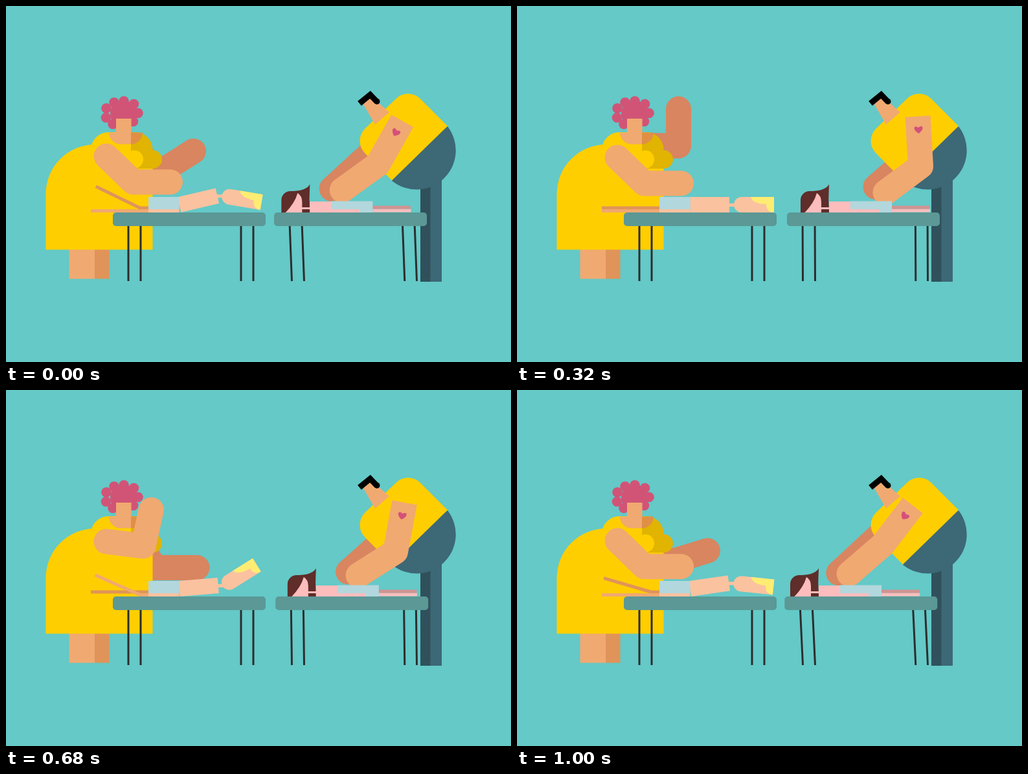
Recreate the animation shown at these times as an HTML page. Size 780x550 px, loop 1.04 s.

```html
<!DOCTYPE html>
<html lang="en">
<head>
<meta charset="utf-8">
<title>Massage</title>
<style>
  html, body { margin: 0; width: 100%; height: 100%; overflow: hidden; background: #64c9c7; }
  svg { display: block; width: 780px; height: 550px; }
  .yellow { fill: #ffce00; }
  .gold { fill: #e0b400; }
  .skin { fill: #f0a971; }
  .tan { fill: #e09459; }
  .curls { fill: #d15477; }
  .pale { fill: #fbc29f; }
  .blond { fill: #ffed73; }
  .rosy { fill: #fdbdbd; }
  .brown { fill: #5f2d2a; }
  .towel { fill: #b2d7dd; }
  .slate { fill: #3d6875; }
  .shade { fill: #30515c; }
  .top { fill: #5b9896; }
  .posts { fill: none; stroke: #2d2d2d; stroke-width: 3; }
  .limb { fill: none; stroke: #f0a971; stroke-width: 39; stroke-linejoin: round; stroke-linecap: round; }
  .far { stroke: #d88560; }
  .shin { stroke-width: 5; stroke-linecap: butt; }
  .shin.far { stroke: #e09459; }
  .cut { stroke-linecap: butt; }
</style>
</head>
<body>
<svg viewBox="0 0 780 550">
  <!-- woman -->
  <path id="farArm" class="limb far"/>
  <path class="skin" d="M97.5 370H137V421.5H97.5z"/>
  <path class="tan" d="M137 370H159.5V421.5H137z"/>
  <path class="yellow" d="M61.5 376.5V290A76 76 0 0 1 137.5 214H200V240H226.5V376.5z"/>
  <path class="yellow" d="M131 222A27 27 0 0 1 158 195H193V260H131z"/>
  <path class="gold" d="M193 195H200A27 27 0 0 1 226.500 222.800A14.200 14.200 0 0 1 227 251.200H193z"/>
  <circle class="yellow" cx="198" cy="237" r="14"/>
  <g id="curls" class="curls"><circle cx="181" cy="166" r="20"/></g>
  <path class="skin" d="M159 195.500H170V174H193.500V213.500H177A18 18 0 0 1 159 195.500z"/>
  <path class="tan" d="M193 195.500H211A18 18 0 0 1 193 213.500z" style="fill:#e08f45"/>

  <!-- left table and client -->
  <path class="posts" d="M189 338V425M208 338V425M363 338V425M382 338V425"/>
  <rect class="top" x="165" y="319" width="236" height="21" rx="5"/>
  <path id="farShin" class="limb shin far"/>
  <path id="nearShin" class="limb shin"/>
  <path class="pale" d="M220 295H267.500V319H220z"/>
  <path id="torso" class="pale" d="M267.500 295H328V319H267.500z"/>
  <path class="towel" d="M220 295H267.500V314H220z"/>
  <g id="neck">
    <path class="pale" d="M326 305H340V310H326z"/>
    <g id="head">
      <path class="pale" d="M347 295H397V319H347A12 12 0 0 1 347 295z"/>
      <path class="blond" d="M361 295Q364 305.500 385 306Q385 319 397 319V295z"/>
    </g>
  </g>
  <path id="nearArm" class="limb"/>

  <!-- man -->
  <path id="farPush" class="limb far"/>
  <path class="shade" d="M640 250H656V426H640z"/>
  <path class="slate" d="M655.500 240H673V426H655.500z"/>
  <path class="slate" d="M682 186A60.500 60.500 0 0 1 596 270L610 240z"/>
  <path class="yellow" d="M596 269.500L554.400 227.600A27 27 0 0 1 554.400 189.400L602 143.400A27 27 0 0 1 640 143.400L682 185.500z"/>
  <path class="skin" d="M552 152L563 139L592 164L570 183z"/>
  <path d="M546 150.500L562.500 137L573 148" fill="none" stroke="#000" stroke-width="9"/>
  <circle cx="573" cy="147.500" r="4.500"/>
  <path id="push" class="limb cut"/>
  <circle id="palm" class="skin" r="19.500"/>
  <path id="heart" fill="#d4517a" d="M0 6C-11 -1 -6 -8.500 0 -3C6 -8.500 11 -1 0 6z"/>

  <!-- right table and client -->
  <path id="posts" class="posts"/>
  <rect id="bench" class="top" x="417" y="319" width="236" height="21" rx="5"/>
  <g id="client">
    <path class="brown" d="M438 319V300A14 14 0 0 1 452 286C465 286 477 284 482 275.500Q480.500 297 482 319z"/>
    <path class="rosy" d="M444.500 319Q459 304 463 289Q470 293 470 303V319z"/>
    <path class="rosy" d="M469 311H483V314H469zM482 302H560V319H482zM579 313.500H638V318.500H579z"/>
    <path fill="#cf9492" d="M579 308.500H637.500V313.500H579z"/>
    <path class="towel" d="M515 301.500H579V319H559V314H515z"/>
  </g>
</svg>
<script>
const LOOP = 1040, BEAT = 520, STEP = 40, LEAD = 80, RISE = 400;
const $ = id => document.getElementById(id);
const set = (id, name, value) => $(id).setAttribute(name, value);
const rad = deg => deg * Math.PI / 180;
const polar = ([x, y], len, deg) => [x + len * Math.cos(rad(deg)), y + len * Math.sin(rad(deg))];
const line = (...pts) => 'M' + pts.map(p => p.map(v => v.toFixed(2)).join(' ')).join('L');

const linear = x => x;
const easeIn = x => x * x;
const easeOut = x => x * (2 - x);
const easeBoth = x => x < .5 ? 2 * x * x : 1 - 2 * (1 - x) ** 2;

// Value at time t on a track that starts at 0; keys are [end time, value, easing].
function track(t, ...keys) {
  let start = 0, from = 0;
  for (const [end, to, ease] of keys) {
    if (t < end) return from + (to - from) * ease((t - start) / (end - start));
    start = end;
    from = to;
  }
  return from;
}

for (const [x, y] of [[155, 158], [167, 149], [182, 147], [197.5, 151.500],
                      [204, 165.500], [196.500, 178.500], [154.500, 172.500], [165, 182.500]]) {
  const curl = document.createElementNS('http://www.w3.org/2000/svg', 'circle');
  curl.setAttribute('cx', x);
  curl.setAttribute('cy', y);
  curl.setAttribute('r', 7.8);
  $('curls').append(curl);
}

function drawWoman(lift, bump, farTurn) {
  const far = farTurn ? lift : 0, near = farTurn ? 0 : lift;

  const drop = Math.sin(rad(50 * (1 - far))) / Math.sin(rad(50));
  const farElbow = [230 + 19.5 * far, 216 + 60 * drop - (farTurn ? 0 : 4.5 * bump)];
  const farHand = polar(farElbow, 65 - 8 * far, -90 * far);
  set('farArm', 'd', line([192, 215.5], farElbow, farHand));

  const shoulder = [155, 234 - (farTurn ? 2.3 * bump : 0)];
  const elbow = polar(shoulder, 57.5, 44 * (1 - near));
  set('nearArm', 'd', line(shoulder, elbow, polar(elbow, 57.2, -90 * near ** .85)));
}

function drawLeftClient(tau, bump, farTurn) {
  const kick = track(tau, [120, 29.3, easeOut], [RISE, 0, easeIn]);
  const shin = (id, y, deg) => set(id, 'd', line([220, y], [207, y], polar([207, y], 76, 180 + deg)));
  shin('farShin', 312, farTurn ? kick : 0);
  shin('nearShin', 316.5, farTurn ? 0 : kick);

  const lean = -14.8 * bump;
  set('torso', 'transform', `rotate(${lean} 267.5 307)`);
  const [x, y] = polar([267.5, 307], 60.5, lean);
  set('neck', 'transform', `translate(${x - 328} ${y - 307})`);
  const nod = track(tau, [120, 10.7, easeOut], [240, -32, easeBoth], [360, 0, easeBoth]);
  set('head', 'transform', `rotate(${nod} 337 307.5)`);
}

function drawMan(push) {
  const palm = [490.5 + 63.5 * push, 283 - 3.5 * push];
  set('farPush', 'd', line(palm, polar(palm, 102, -43 + 2 * push)));

  // Two-bone arm: the elbow follows from the shoulder and the hand.
  const upper = 77, fore = 68;
  const [sx, sy] = [610.5 + 8.5 * push, 179.3 - 8.8 * push];
  const [hx, hy] = [506.8 + 62.2 * push, 283.5 + 4.5 * push];
  const dist = Math.hypot(hx - sx, hy - sy);
  const ux = (hx - sx) / dist, uy = (hy - sy) / dist;
  const along = (upper ** 2 - fore ** 2 + dist ** 2) / (2 * dist);
  const bend = Math.sqrt(Math.max(0, upper ** 2 - along ** 2));
  const ex = sx + ux * along + uy * bend, ey = sy + uy * along - ux * bend;
  set('push', 'd', line([sx, sy], [ex, ey], [hx, hy]));
  set('palm', 'cx', hx);
  set('palm', 'cy', hy);

  const turn = Math.atan2(ey - sy, ex - sx) * 180 / Math.PI;
  const [tx, ty] = polar([sx, sy], 20.5, turn);
  set('heart', 'transform', `translate(${tx} ${ty}) rotate(${turn - 90})`);
}

function drawRightClient(lift) {
  const sway = -4.6 * (1 - lift);
  set('bench', 'transform', `translate(${sway})`);
  set('posts', 'd', [441.5, 460.5, 615.8, 634.5].map(x => line([x + sway - .4, 338], [x, 425])).join(''));
  set('client', 'transform', `translate(${-19.75 * (1 - lift)})`);
}

function draw(time) {
  const t = (Math.floor(time / STEP) * STEP + LEAD) % LOOP;
  const tau = t % BEAT, farTurn = t < BEAT;
  const lift = track(tau, [RISE, 1, easeOut], [BEAT, 0, easeIn]);
  const push = track(tau, [RISE, 1, linear], [BEAT, 0, linear]);
  const bump = track(tau, [120, 1, easeOut], [320, 0, easeBoth]);
  drawWoman(lift, bump, farTurn);
  drawLeftClient(tau, bump, farTurn);
  drawMan(push);
  drawRightClient(lift);
}

function tick() {
  draw(performance.now());
  requestAnimationFrame(tick);
}
tick();
</script>
</body>
</html>
```
